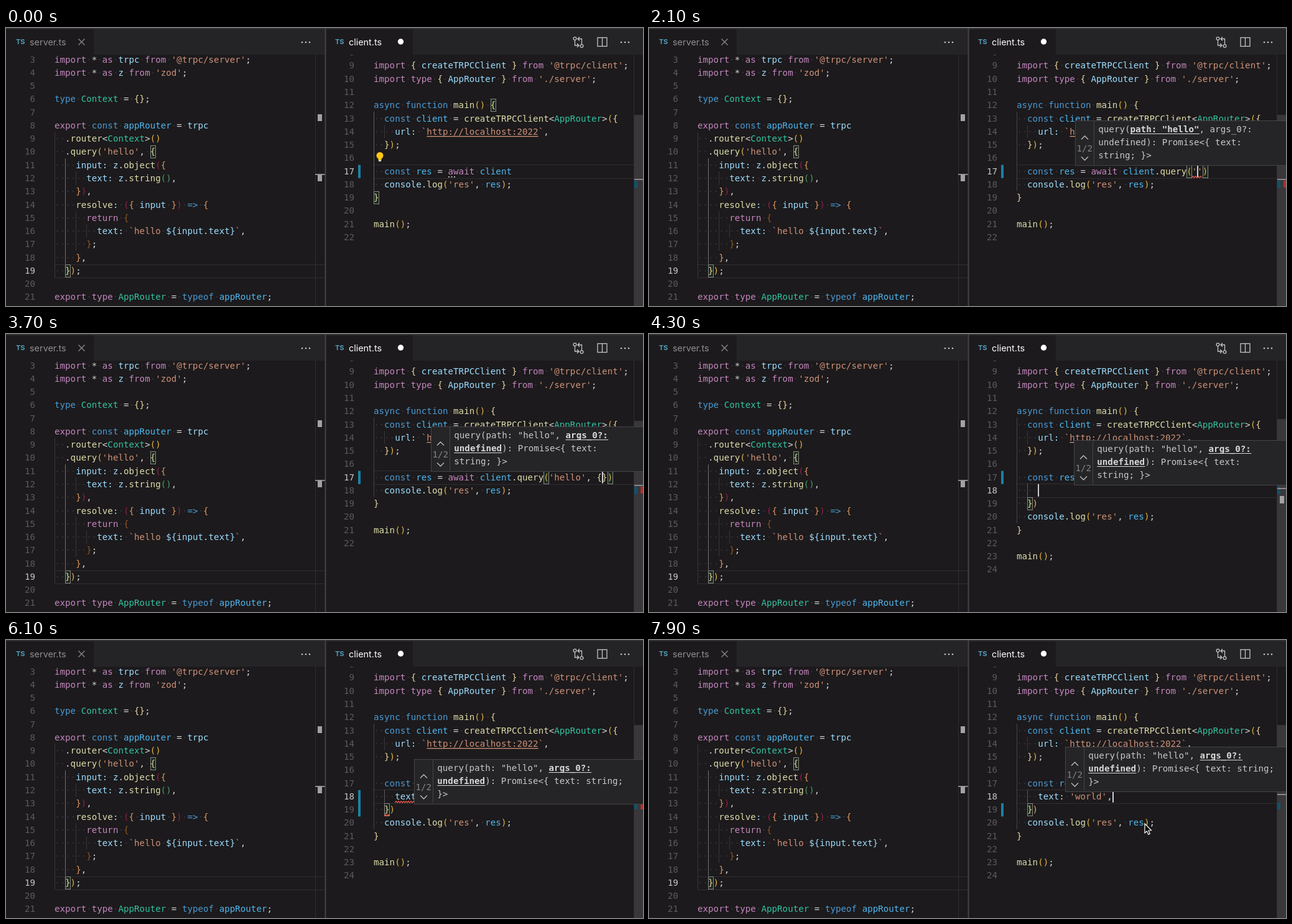
An HTML page with a canvas that plays this animation: 1024x448 px, repeating every 8 s.

```html
<!DOCTYPE html>
<html lang="en">
<head>
<meta charset="utf-8">
<style>
  html, body { margin: 0; width: 100%; height: 100%; overflow: hidden; background: #1c1a1c; }
  canvas { display: block; width: 1024px; height: 448px; }
</style>
</head>
<body>
<canvas id="stage" width="1024" height="448"></canvas>
<script>
const g = document.getElementById("stage").getContext("2d");
const LOOP = 8000, CHAR = 8.537, ROW = 21.27;
const MONO = "14.18px 'DejaVu Sans Mono', monospace";
const UI = "Inter, sans-serif";
const BG = "#1c1a1c", BAR = "#242325";

// "~x" inside a line switches to colour x
const colors = {
  w: "#d4d4d4", p: "#c586c0", k: "#4a9ad4", v: "#9cdcfe", c: "#4db8f0", t: "#32c3a2",
  f: "#dcdcaa", s: "#ce9178", g: "#e3b341", y: "#e5d3a0", m: "#94204a", o: "#dc9560",
  b: "#8d5424", n: "#4a9a68", i: "#c8c8c8", d: "#9aa9b5", B: "#d8d8d8", h: "#2aaaff",
  x: "#5c5a5d", X: "#c6c6c6", z: "#858386"
};

const serverLines = [
  "~pimport ~w* ~pas ~vtrpc ~pfrom ~s'@trpc/server'~w;",
  "~pimport ~w* ~pas ~vz ~pfrom ~s'zod'~w;",
  "",
  "~ktype ~tContext ~w= ~y{}~w;",
  "",
  "~pexport ~kconst ~cappRouter ~w= ~vtrpc",
  "  ~w.~frouter~w<~tContext~w>~g()",
  "  ~w.~fquery~g(~s'hello'~w, ~y{",
  "    ~vinput: z~w.~fobject~m(~o{",
  "      ~vtext: z~w.~fstring~n()~w,",
  "    ~o}~m)~w,",
  "    ~fresolve~v: ~m(~o{ ~vinput ~o}~m) ~k=> ~o{",
  "      ~preturn ~b{",
  "        ~vtext: ~s`hello ~v${input~w.~vtext}~s`~w,",
  "      ~b}~w;",
  "    ~o}~w,",
  "  ~y}~g)~w;",
  "",
  "~pexport type ~tAppRouter ~w= ~ktypeof ~cappRouter~w;"
];
const clientHead = [
  "",
  "~pimport ~y{ ~vcreateTRPCClient ~y} ~pfrom ~s'@trpc/client'~w;",
  "~pimport type ~y{ ~vAppRouter ~y} ~pfrom ~s'./server'~w;",
  "",
  "~kasync function ~fmain~g() ~y{",
  "  ~kconst ~cclient ~w= ~fcreateTRPCClient~w<~tAppRouter~w>~g(~y{",
  "    ~vurl: ~s`http://localhost:2022`~w,",
  "  ~y}~g)~w;",
  ""
];
const clientTail = ["  ~vconsole~w.~flog~g(~s'res'~w, ~cres~g)~w;", "~y}", "", "~fmain~g()~w;", ""];

// What follows "await client" from each moment on; "|" is the caret
const arg = ".query('hello', {\n    ";
const edits = [
  [-500, "|"], [1000, ".|"], [1200, ".q|"], [1500, ".query|"], [1800, ".query(|)"],
  [2100, ".query('|')"], [2300, ".query('h|')"], [2400, ".query('he|')"], [2500, ".query('hel|')"],
  [2700, ".query('hell|')"], [2800, ".query('hello|')"], [3200, ".query('hello'|)"],
  [3400, ".query('hello',|)"], [3500, ".query('hello', |)"], [3700, ".query('hello', {|})"],
  ...[[4000, "|"], [4600, "t|"], [4800, "te|"], [5500, "text|"], [6200, "text:|"], [6400, "text: |"],
    [7000, "text: '|'"], [7100, "text: 'w|'"], [7200, "text: 'wo|'"], [7300, "text: 'wor|'"],
    [7400, "text: 'worl|'"], [7500, "text: 'world|'"], [7600, "text: 'world'|"], [7700, "text: 'world',|"]
  ].map(([at, s]) => [at, arg + s + "\n  })"])
];

// Signature hints: start, left, bottom, rows
const second = 'query(path: "hello", ~Bargs_0?:';
const short = [second, "~Bundefined~i): Promise<{ text:", "string; }>"];
const long = [second, "~Bundefined~i): Promise<{ text: string;", "}>"];
const hints = [
  [1900, 685, 221, ['query(~Bpath: "hello"~i, args_0?:', "undefined): Promise<{ text:", "string; }>"]],
  [3400, 683, 221, short], [4000, 683, 243, short],
  [4600, 634, 243, [second, "~Bundefined~i): Promise<{ text: string; }>"]],
  [5500, 656, 264, long], [7000, 669, 244, long]
];

// Completion lists: start, end, top, [label, detail] rows
const lists = [
  [1200, 1500, 243, [["~hq~wuery", "(property) query: inferHandlerFn<Readonl…"], ["~wre~hq~wuest", ""]]],
  [4800, 5500, 263, [["~hte~wxt", "(property) text: string"]]]
];

const rect = (x, y, w, h, color) => { g.fillStyle = color; g.fillRect(x, y, w, h); };
const serverY = n => 50.6 + (n - 3) * ROW;
const clientY = n => 60.43 + (n - 9) * ROW;
const between = (t, a, b) => t >= a && t < b;
const latest = (items, t) => items.filter(item => item[0] <= t).pop();

function stroke(color, width, ...lines) {
  g.strokeStyle = color;
  g.lineWidth = width;
  g.beginPath();
  for (const [x, y, ...rest] of lines) {
    g.moveTo(x, y);
    for (let i = 0; i < rest.length; i += 2) g.lineTo(rest[i], rest[i + 1]);
  }
  g.stroke();
}

function circle(x, y, r, color, outline) {
  g.beginPath();
  g.arc(x, y, r, 0, 7);
  if (outline) { g.strokeStyle = color; g.stroke(); }
  else { g.fillStyle = color; g.fill(); }
}

function mono(line, x, y, style = "w", dots = false) {
  const base = Math.round(y + 5);
  for (let i = 0; i < line.length; i++) {
    if (line[i] === "~") { style = line[++i]; continue; }
    if (line[i] !== " ") {
      g.font = (style === "B" || style === "h" ? "bold " : "") + MONO;
      g.fillStyle = colors[style];
      g.fillText(line[i], x, base);
    } else if (dots) rect(x + 3.6, base - 5.6, 1.5, 1.5, "#454346");
    if (style === "B") rect(x, base + 2, CHAR + 0.3, 1, colors.B);
    x += CHAR;
  }
}

function label(text, x, y, size, color, weight = 400) {
  g.font = `${weight} ${size}px ${UI}`;
  g.fillStyle = color;
  g.fillText(text, x, y);
}

function squiggle(x, y, chars) {
  const points = [];
  for (let i = 0; i <= chars * CHAR; i += 2) points.push(x + i, y + (i % 4 ? -1.2 : 1.2));
  stroke("#e8564a", 1.2, points);
}

function bracketBox(x, y) {
  rect(x, y - 10, 9, 20, "#1b291e");
  g.strokeStyle = "#858585";
  g.lineWidth = 1;
  g.strokeRect(Math.round(x) + 0.5, Math.round(y) - 9.5, 8, 20);
}

function guide(x, y, rows, color = "#39373a") {
  rect(Math.round(x), y - ROW / 2, 1, rows * ROW, color);
}

function currentLine(x, y, right) {
  rect(x, Math.round(y - 10.4), right - x, 1, "#302e31");
  rect(x, Math.round(y + 11), right - x, 1, "#302e31");
}

function numbers(first, count, right, yOf, active) {
  for (let n = first; n < first + count; n++) {
    const s = String(n);
    mono(s, right - s.length * CHAR, yOf(n), n === active ? "X" : "x");
  }
}

function drawServer() {
  const x = 78;
  currentLine(x, serverY(19), 513);
  guide(x, serverY(9), 11);
  guide(x + 2 * CHAR, serverY(11), 8, "#707070");
  guide(x + 4 * CHAR, serverY(12), 1);
  guide(x + 4 * CHAR, serverY(15), 3);
  guide(x + 6 * CHAR, serverY(16), 1);
  bracketBox(x + 18 * CHAR, serverY(10));
  bracketBox(x + 2 * CHAR, serverY(19));
  numbers(3, 19, 47, serverY, 19);
  serverLines.forEach((line, i) => mono(line, x, serverY(i + 3), "w", true));
  rect(497, 43, 1, 405, "#302e31");
  rect(501, 139, 7, 11, "#a3a1a4");
  rect(497, 235, 16, 2, "#8a888b");
  rect(501, 236, 7, 11, "#a3a1a4");
}

function paint(text) {
  return text.replace(/'[^']*'?|\w+|[{}]|[()]/g, token => {
    const style = token[0] === "'" ? "s" : token === "query" ? "f"
      : /\w/.test(token) ? "v" : /[{}]/.test(token) ? "y" : "g";
    return "~" + style + token + "~w";
  });
}

function drawClient(t) {
  const x = 591, at = col => x + col * CHAR;
  const [typed, text] = latest(edits, t);
  const rows = text.replace("|", "").split("\n");
  const before = text.split("|")[0].split("\n");
  const multi = rows.length > 1;
  const active = 16 + before.length;
  const caretCol = before.at(-1).length + (multi ? 0 : 26);
  const lines = [...clientHead, "  ~kconst ~cres ~w= ~pawait ~cclient~w" + paint(rows[0]),
    ...rows.slice(1).map(paint), ...clientTail];

  currentLine(x, clientY(active), 1009);
  guide(x, clientY(13), multi ? 8 : 6, t < 1800 ? "#606060" : "#454346");
  guide(at(2), clientY(14), 1);
  if (multi) guide(at(2), clientY(18), 1, "#5a585b");

  if (t < 1800) {
    bracketBox(at(22), clientY(12));
    bracketBox(x, clientY(19));
  } else if (multi) {
    bracketBox(at(2), clientY(19));
  } else {
    bracketBox(at(32), clientY(17));
    bracketBox(at(26 + rows[0].length - 1), clientY(17));
  }

  numbers(8, lines.length, 560, clientY, active);
  lines.forEach((line, i) => mono(line, x, clientY(i + 8), "w", true));
  rect(at(10), Math.round(clientY(14) + 7), 21 * CHAR, 1.3, colors.s);

  const [barTop, barRows] = t < 4600 ? [17, 1] : t < 5500 ? [18, 1] : t < 7000 ? [18, 2] : [19, 1];
  rect(566, clientY(barTop) - 10, 4, barRows * ROW, "#1b81a8");

  if (t < 1000) {
    circle(601, 205.5, 5.5, "#ffc818");
    rect(598.5, 209, 5, 4, "#ffc818");
    rect(599, 213, 4, 2, "#d6d6d6");
    for (let i = 0; i < 3; i++) rect(711 + i * 4.5, 239, 2, 2, "#b5b3b6");
  }
  if (between(t, 1100, 1800)) squiggle(at(8), 240, 3);
  if (between(t, 2100, 3700)) squiggle(at(33), 240, rows[0].match(/'.*'/)[0].length);
  if (between(t, 4600, 7000)) squiggle(at(4), 261, Math.min(4, rows[1].trim().length));
  if (between(t, 5500, 7000)) squiggle(at(2), 282.5, 1);

  if ((t - typed) % 1000 < 500) rect(Math.round(at(caretCol)), clientY(active) - 10, 2, 20, "#d0ced1");
}

function drawRuler(t) {
  rect(1009, 43, 1, 405, "#302e31");
  rect(1010, t < 4000 ? 140 : 137, 14, 311, "#39373a");
  const [blueY, blueH] = t < 4600 ? [246, 12] : t < 5500 ? [250, 22] : t < 7000 ? [264, 9] : [262, 11];
  rect(1010, blueY, 5, blueH, "#15506a");
  const red = between(t, 1100, 1800) ? [246, 22] : between(t, 1800, 4000) ? [246, 11]
    : between(t, 4600, 5500) ? [250, 12] : between(t, 5500, 7000) ? [264, 9] : null;
  if (red) rect(1020, red[0], 4, red[1], "#a8322c");
  if (between(t, 4000, 4600)) rect(1014, 261, 7, 12, "#a3a1a4");
  rect(1010, t < 4000 ? 243 : 248, 14, 2, "#8a888b");
}

function panel(x, y, w, h) {
  rect(x, y, w, h, "#464447");
  rect(x + 1, y + 1, w - 2, h - 2, "#252426");
}

function drawHint(t) {
  const hint = latest(hints, t);
  if (!hint) return;
  const [, left, bottom, rows] = hint;
  const top = bottom - rows.length * 21 - 9.5, mid = bottom - 27.5;
  panel(left, Math.round(top), 1030 - left, Math.round(bottom - top));
  rect(left + 30, top + 1, 1, bottom - top - 2, "#464447");
  rows.forEach((row, i) => mono(row, left + 37.3, top + 14.6 + i * 20.8, "i"));
  mono("1/2", left + 2.5, mid, "z");
  const ax = left + 15.5, up = mid - 17, down = mid + 17;
  stroke("#c0bec1", 1.3, [ax - 5.5, up + 3, ax, up - 2.5, ax + 5.5, up + 3],
    [ax - 5.5, down - 3, ax, down + 2.5, ax + 5.5, down - 3]);
}

function cube(x, y) {
  stroke("#75beff", 1.3,
    [x - 8, y - 2, x + 1, y - 7, x + 8, y - 3, x + 8, y + 3, x - 1, y + 7, x - 8, y + 4, x - 8, y - 2, x - 1, y + 1, x + 8, y - 3],
    [x - 1, y + 1, x - 1, y + 7]);
}

function drawList(t) {
  const list = lists.find(([from, to]) => between(t, from, to));
  if (!list) return;
  const [, , top, rows] = list;
  panel(467, top, 542, rows.length * 21 + 4);
  rect(468, top + 1, 540, 22, "#062f4b");
  rows.forEach(([name, detail], i) => {
    const y = top + 10.5 + i * 20.8;
    cube(480, y);
    mono(name, 494, y);
    mono(detail, 996 - detail.length * CHAR, y, "d");
  });
}

function drawTabs() {
  const icon = "#c5c3c6";
  rect(0, 0, 1024, 43, BAR);
  rect(0, 2, 141, 41, BG);
  rect(514, 2, 140, 41, BG);
  rect(0, 0, 1024, 2, "#323033");
  label("TS", 16, 26, 11, "#519aba", 700);
  label("server.ts", 38, 28, 14.4, "#8f8d90");
  label("TS", 529, 26, 11, "#519aba", 700);
  label("client.ts", 551, 28, 14.4, "#ffffff");
  stroke("#8f8d90", 1.2, [116.5, 17.5, 126.5, 27.5], [126.5, 17.5, 116.5, 27.5]);
  circle(634.5, 22, 4.7, "#ffffff");
  for (const x of [482, 995]) for (const dx of [-6, 0, 6]) circle(x + dx, 23, 1.3, icon);

  stroke(icon, 1.3, [914.5, 19, 914.5, 28, 921, 28], [918, 25, 921, 28, 918, 31],
    [925.5, 26, 925.5, 17.5, 919, 17.5], [922, 14.5, 919, 17.5, 922, 20.5]);
  circle(914.5, 17, 2.4, icon, true);
  circle(925.5, 29, 2.4, icon, true);
  g.strokeRect(951, 15.5, 15, 14);
  stroke(icon, 1.3, [958.5, 15.5, 958.5, 29.5]);
}

function drawPointer() {
  g.beginPath();
  [[0, 0], [0, 15], [3.4, 12], [5.8, 17.4], [8.2, 16.3], [5.9, 11], [10.4, 10.8]]
    .forEach(([x, y]) => g.lineTo(797 + x, 296 + y));
  g.closePath();
  g.fillStyle = "#000";
  g.fill();
  g.strokeStyle = "#fff";
  g.lineWidth = 1.2;
  g.stroke();
}

function frame() {
  const t = performance.now() % LOOP;
  rect(0, 0, 1024, 448, BG);
  drawServer();
  drawClient(t);
  drawRuler(t);
  drawTabs();
  rect(512.5, 0, 2, 448, "#454346");
  drawHint(t);
  drawList(t);
  if (t >= 7800) drawPointer();
  requestAnimationFrame(frame);
}
frame();
</script>
</body>
</html>
```
